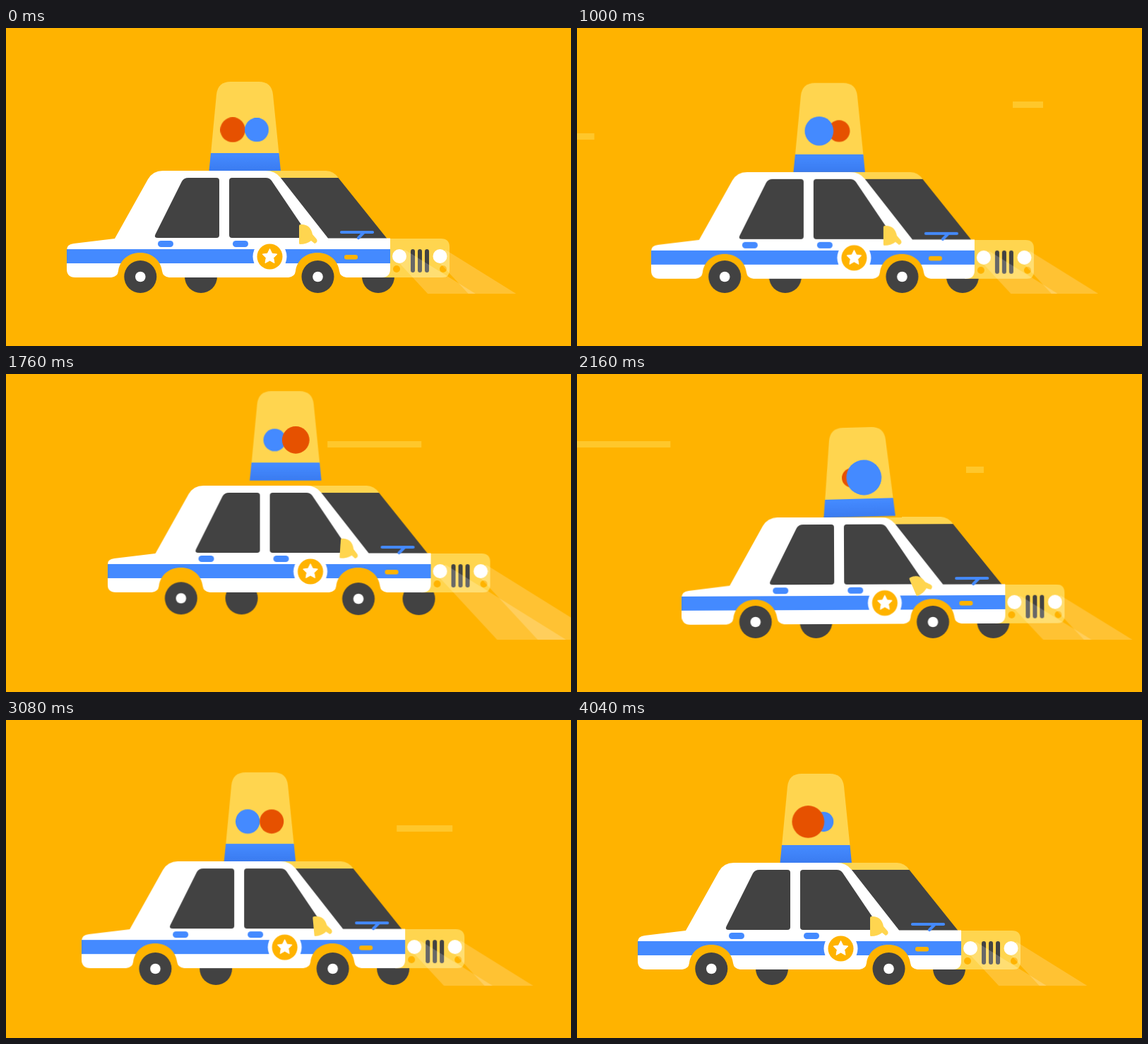
An HTML page without scripts for the animation above (4.08 s loop, 800 px wide and 450 px high).

```html
<!DOCTYPE html>
<html lang="en">
<head>
<meta charset="utf-8">
<title>Patrol car</title>
<style>
html, body { margin: 0; width: 100%; height: 100%; overflow: hidden; background: #ffb300; }
svg { display: block; width: 100%; height: 100%; }

.sky { fill: #ffb300; }
.pale { fill: #ffd54f; }
.white { fill: #fff; }
.dark { fill: #424242; }
.blue { fill: #448aff; }
.red { fill: #e65100; }
.beam { fill: #fff; fill-opacity: .2; }

.drive, .body, .siren, .lag, .mirror, .rear, .front, .streaks rect { animation: 4080ms linear infinite; }
.drive { animation-name: drive; }
.body { animation-name: body; transform-origin: 315px 352px; }
.siren { animation-name: siren; transform-origin: 288px 202px; }
.lag { animation-name: lag; }
.mirror { animation-name: mirror; transform-origin: 437px 301px; }
.rear { animation-name: rear; }
.front { animation-name: front; }
.streaks rect { animation-name: streak; animation-delay: calc(var(--at) * 1ms - 4080ms); fill: #ffc72b; height: 9px; }
.lamp { animation: orbit 680ms linear infinite; }
.half { animation-delay: -340ms; }
.near { animation: near 680ms step-end infinite; }

@keyframes drive {
  0%, 9.8% { transform: translateX(0); animation-timing-function: cubic-bezier(.33, 0, .67, 1); }
  50.5% { transform: translateX(63px); animation-timing-function: cubic-bezier(.33, 0, .45, 1); }
  99%, 100% { transform: translateX(0); }
}
@keyframes body {
  0% { transform: translateY(0) rotate(0deg); animation-timing-function: ease-in-out; }
  14.7% { transform: translateY(3px) rotate(0deg); animation-timing-function: ease-in-out; }
  22% { transform: translateY(1px) rotate(0deg); animation-timing-function: ease-in-out; }
  30.4% { transform: translateY(5px) rotate(0deg); animation-timing-function: ease-in; }
  33.33% { transform: translateY(-16px) rotate(-1.75deg); animation-timing-function: ease-out; }
  41.67% { transform: translateY(-46px) rotate(0deg); animation-timing-function: ease-in; }
  51% { transform: translateY(3px) rotate(.4deg); animation-timing-function: ease-in-out; }
  52.94% { transform: translateY(1px) rotate(-.25deg); animation-timing-function: ease-out; }
  57.84% { transform: translateY(-14px) rotate(-.5deg); animation-timing-function: ease-in; }
  63.7% { transform: translateY(5px) rotate(0deg); animation-timing-function: ease-in-out; }
  67.65% { transform: translateY(4px) rotate(0deg); animation-timing-function: ease-in-out; }
  74.5% { transform: translateY(-2px) rotate(0deg); animation-timing-function: ease-in-out; }
  84.3% { transform: translateY(4.5px) rotate(0deg); animation-timing-function: ease-in-out; }
  99%, 100% { transform: translateY(0) rotate(0deg); }
}
@keyframes siren {
  0%, 30.4% { transform: translateY(0) rotate(0deg); }
  33.33% { transform: translateY(0) rotate(-3.2deg); animation-timing-function: ease-out; }
  41.67% { transform: translateY(-8px) rotate(0deg); animation-timing-function: ease-in; }
  51% { transform: translateY(0) rotate(0deg); }
  52.94% { transform: translateY(0) rotate(-1.3deg); }
  57.84% { transform: translateY(-3px) rotate(-1.5deg); }
  63.7% { transform: translateY(0) rotate(0deg); }
  67.65% { transform: translateY(0) rotate(-.7deg); }
  74.5%, 100% { transform: translateY(0) rotate(0deg); }
}
@keyframes lag {
  0%, 30.4% { transform: translateY(0); }
  33.33% { transform: translateY(-1px); }
  52.94% { transform: translateY(3px); }
  67.65% { transform: translateY(4px); }
  80%, 100% { transform: translateY(0); }
}
@keyframes mirror {
  0%, 8% { transform: rotate(0deg); }
  14.7% { transform: rotate(-9deg); }
  22%, 33.33% { transform: rotate(0deg); }
  41.67% { transform: rotate(8deg); }
  52.94% { transform: rotate(-23deg); }
  60%, 67.65% { transform: rotate(0deg); }
  84.3% { transform: rotate(-11deg); }
  93%, 100% { transform: rotate(0deg); }
}
@keyframes rear {
  0%, 32.5% { transform: translateY(0); animation-timing-function: ease-in; }
  33.33% { transform: translateY(-3px); animation-timing-function: ease-out; }
  41.67% { transform: translateY(-36px); animation-timing-function: ease-in; }
  51.5% { transform: translateY(0); }
  52.94% { transform: translateY(-1px); animation-timing-function: ease-out; }
  57.84% { transform: translateY(-10px); animation-timing-function: ease-in; }
  63.2%, 100% { transform: translateY(0); }
}
@keyframes front {
  0%, 31.6% { transform: translateY(0); animation-timing-function: ease-in; }
  33.33% { transform: translateY(-10px); animation-timing-function: ease-out; }
  41.2% { transform: translateY(-36px); animation-timing-function: ease-in; }
  51.2% { transform: translateY(0); }
  52.94% { transform: translateY(-1px); animation-timing-function: ease-out; }
  57.84% { transform: translateY(-10px); animation-timing-function: ease-in; }
  63%, 100% { transform: translateY(0); }
}
@keyframes streak {
  0% { transform: translateX(780px) scaleX(0); }
  4% { transform: translateX(594px) scaleX(1); }
  20%, 100% { transform: translateX(-150px) scaleX(1); }
}
@keyframes orbit {
  0%, 100% { transform: translateX(-17px) scale(1.77); }
  5.9% { transform: translateX(-17px) scale(1.68); }
  17.6% { transform: translateX(-10px) scale(1.35); }
  27.9% { transform: translateX(0) scale(1.25); }
  38.2% { transform: translateX(9px) scale(1.3); }
  44.1% { transform: translateX(11px) scale(1.4); }
  50% { transform: translateX(17px) scale(1.66); }
  55.9% { transform: translateX(17px) scale(1.75); }
  67.6% { transform: translateX(8px) scale(2.47); }
  77.9% { transform: translateX(0) scale(2.55); }
  88.2% { transform: translateX(-8px) scale(2.5); }
  94.1% { transform: translateX(-10.5px) scale(2.3); }
}
@keyframes near {
  0% { visibility: visible; }
  50%, 100% { visibility: hidden; }
}
</style>
</head>
<body>
<svg viewBox="0 0 800 450" xmlns="http://www.w3.org/2000/svg">
  <defs>
    <clipPath id="ground"><rect width="800" height="375.3"/></clipPath>
    <linearGradient id="band" x2="0" y2="1">
      <stop offset=".1" stop-color="#448aff"/>
      <stop offset="1" stop-color="#3a7bf0"/>
    </linearGradient>
    <path id="arch" d="M149 354V353Q158 352 159 344C161 328 174 318 190 318S219 328 221 344Q222 352 231 353V354z"/>
    <path id="ray" d="M548 323L565 314L800 460H675z"/>
    <rect id="bar" y="313" width="6" height="33" rx="3"/>
    <rect id="handle" y="301" width="22" height="9" rx="4.5"/>
    <g id="wheel"><circle class="dark" r="23"/><circle class="white" r="7.3"/></g>
  </defs>

  <rect class="sky" width="800" height="450"/>

  <g class="streaks">
    <rect y="149" width="48" style="--at:296"/>
    <rect y="104" width="49" style="--at:858"/>
    <rect y="95" width="133" style="--at:1476"/>
    <rect y="131" width="25" style="--at:1960"/>
    <rect y="221" width="110" style="--at:2198"/>
    <rect y="149" width="79" style="--at:2882"/>
    <rect y="257" width="105" style="--at:3205"/>
  </g>

  <g clip-path="url(#ground)">
    <g class="drive">
      <g class="rear"><circle class="dark" cx="276" cy="352" r="23"/></g>
      <g class="front"><circle class="dark" cx="527" cy="352" r="23"/></g>

      <g class="body">
        <g class="siren">
          <path class="pale" d="M290 178L298 94Q300 76 318 76H358Q376 76 378 94L386.5 178z"/>
          <path fill="url(#band)" d="M290 177H386.5L389 202.5H287.5z"/>
          <g transform="translate(338 144)">
            <g class="lag">
              <circle class="lamp half blue" r="10"/>
              <circle class="lamp red" r="10"/>
              <g class="near"><circle class="lamp half blue" r="10"/></g>
            </g>
          </g>
        </g>

        <!-- front end -->
        <path class="pale" d="M536 298H616Q628 298 628 310V343Q628 353 618 353H530z"/>
        <circle class="sky" cx="553" cy="341" r="5"/>
        <circle class="sky" cx="619" cy="341" r="5"/>
        <g class="dark">
          <use href="#bar" x="573"/><use href="#bar" x="583"/><use href="#bar" x="593"/>
        </g>
        <g class="beam"><use href="#ray"/><use href="#ray" x="57.5"/></g>
        <circle class="white" cx="557" cy="323" r="10"/>
        <circle class="white" cx="614.5" cy="323" r="10"/>

        <!-- windscreen -->
        <path class="pale" d="M365 202H453Q464 202 471 212.500H380z"/>
        <path class="dark" d="M380 212H470.500L539.500 298H440z"/>

        <!-- shell -->
        <path class="white" d="M86 314Q86 306 96 305L154 298L201 214Q208 202 222 202H368Q381 202 388.500 211.500L456 297.500H544V341Q544 353 532 353H98Q86 353 86 341z"/>
        <path class="blue" d="M86 313H544V333H86z"/>
        <g class="dark">
          <path d="M258 212H298Q302 212 302 216V293Q302 297 298 297H215Q209 297 211.500 292L249 217Q252 212 258 212z"/>
          <path d="M320 212H368Q373 212 376 216L426 290Q429 297 423 297H320Q316 297 316 293V216Q316 212 320 212z"/>
        </g>
        <g class="blue"><use href="#handle" x="215"/><use href="#handle" x="321"/></g>
        <g class="sky">
          <use href="#arch"/><use href="#arch" x="251"/>
          <rect x="479" y="321" width="19" height="6.500" rx="3"/>
        </g>
        <g transform="translate(373.5 323.5)">
          <circle class="white" r="24"/>
          <circle class="sky" r="18"/>
          <path class="white" stroke="#fff" stroke-linejoin="round" d="M0-11L3.200-4.400L10.400-3.400L5.200 1.700L6.500 9L0 5.500L-6.500 9L-5.200 1.700L-10.400-3.400L-3.200-4.400z"/>
        </g>
        <path d="M475 289H519M506 290L499 297" fill="none" stroke="#448aff" stroke-width="4.200" stroke-linecap="round"/>
        <path class="mirror pale" d="M417 278Q431 277 434 292L440 299Q442 303 437 305L432 301Q426 306 416 306Q415 306 415 304V280Q415 278 417 278z"/>
      </g>

      <g class="rear"><use href="#wheel" x="190.300" y="352"/></g>
      <g class="front"><use href="#wheel" x="441.500" y="352"/></g>
    </g>
  </g>
</svg>
</body>
</html>
```
